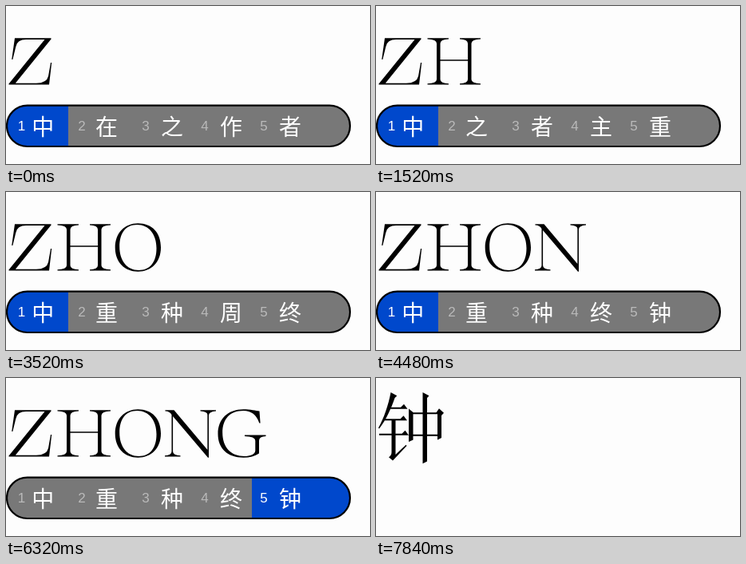
Recreate the animation shown at these times as an HTML page with a canvas. Size 456 by 198 pixels, loop 9840 ms.

```html
<!DOCTYPE html>
<html lang="zh-Hans">
<head>
<meta charset="utf-8">
<title>Pinyin input</title>
<style>
  html, body { margin: 0; width: 100%; height: 100%; overflow: hidden; background: #fdfdfd; }
  canvas { display: block; }
</style>
</head>
<body>
<canvas id="stage" width="456" height="198"></canvas>
<script>
const ctx = document.getElementById('stage').getContext('2d');
const LOOP = 9840;

// Each step: start time, letters typed, candidates, selected index.
const STEPS = [
  [0, 1, '中在之作者', 0],
  [1120, 2, '中之者主重', 0],
  [2640, 3, '中重种周终', 0],
  [4000, 4, '中重种终钟', 0],
  [5120, 5, '中重种终钟', 0],
  [6320, 5, '中重种终钟', 4],
  [7840, 0, '', -1]
];

const DIGIT_X = [19.5, 95, 175, 249, 323];
const WORD_X = [46.2, 126, 208, 282, 356];

// Upright stem from x0 to x1 with thin bracketed serifs, as one outline.
function stem(left, right, x0, x1) {
  return `M${left} 40.2H${right}V41.4Q${x1} 41.8 ${x1} 47V92Q${x1} 97 ${right} 97.3V98.6` +
    `H${left}V97.3Q${x0} 97 ${x0} 92V47Q${x0} 41.8 ${left} 41.4Z`;
}

const LETTERS = [
  // Z
  'M11 40.2H56.5V41.4L11.8 96.8H38Q51 96.6 53 88L56 71H57.2L54 98.6H3.5V97.4L48.5 42H25' +
  'Q14 42 12.3 51L8.4 67H7.2Z',
  // H
  stem(64.5, 91, 76, 80.5) + stem(105, 131, 115, 119.5) + 'M79 67.3H116V68.7H79Z',
  // O
  'M165.3 39.2C183 39.2 194 51 194 69.5S182 99.7 165.3 99.7 136.7 88 136.7 69.5 149 39.2 165.3 39.2Z' +
  'M164.3 41C149.5 41 142.2 52 142.2 68.5C142.2 86 151.5 98 166.3 98' +
  'C181 98 188.5 87 188.5 70.5C188.5 53 179 41 164.3 41Z',
  // N
  'M199.5 40.2H210.5L252.4 90V46Q252.4 42 243.5 41.5V40.2H263V41.5Q254 42 254 47V99.8H253' +
  'L209.1 48V92Q209.1 97 218.5 97.3V98.6H199V97.3Q207.5 97 207.5 92V46Q205 41.7 199.5 41.5Z',
  // G
  'M317.5 41.5L318.6 56.5H317.3C314 46 307 41 297.5 41C280 41 271.2 52 271.2 68.5' +
  'C271.2 87 282 98 298.5 98C306 98 312.3 95.6 312.3 91V78.5Q312.3 73.3 299 72.9V71.6H325.5V72.9' +
  'Q317 73.3 317 78.5V94.5C312 98 305 99.7 297.5 99.7C277 99.7 265.5 88 265.5 70' +
  'C265.5 51 278 39.2 297.5 39.2C306 39.2 313 41 317.5 41.5Z'
].map(d => new Path2D(d));

// Horizontal brush stroke ending in a triangular tip.
function across(x0, x1, y, tip) {
  return `M${x0} ${y - 1}H${x1 - tip * 1.7}L${x1 - tip * .9} ${y - tip}L${x1} ${y + 1}H${x0}Z`;
}

const CLOCK = new Path2D([
  'M18.5 18L26.3 22.3L23.5 25C19 38 13 52 4 63.5L3 62.5C10 50 15.5 34 18.5 18Z',
  across(16.5, 39.5, 37.8, 5),
  across(11, 39, 52.2, 5),
  across(4, 41, 70.8, 5),
  'M19.5 52H24.5V96L37.5 83.8L38.5 85L21 103.5L16 99.2Q19.5 97 19.5 93Z',
  'M41 38.5L46.5 43V77.5L41 80Z',
  'M44 43.3H75.5L79 38.2L85 43.8L82 47V75L77 77.5V45.3H44Z',
  'M44 70.8H79V72.8H44Z',
  'M58.5 18L66.5 22.3L64 25V104.5L58.5 107.3Z'
].join(''));

function drawBar(words, selected) {
  const bar = new Path2D();
  bar.roundRect(1, 124.6, 430, 51.4, 25.7);
  ctx.save();
  ctx.clip(bar);
  ctx.fillStyle = '#787878';
  ctx.fillRect(0, 123, 432, 55);
  ctx.fillStyle = '#0048cc';
  if (selected === 0) ctx.fillRect(0, 123, 78, 55);
  else ctx.fillRect(308, 123, 124, 55);
  ctx.restore();
  ctx.strokeStyle = '#000';
  ctx.lineWidth = 2.2;
  ctx.stroke(bar);

  ctx.textAlign = 'center';
  [...words].forEach((word, i) => {
    ctx.font = '17px "Liberation Sans", Arial, sans-serif';
    ctx.fillStyle = i === selected ? '#fff' : '#bababa';
    ctx.fillText(i + 1, DIGIT_X[i], 156);
    ctx.font = '28px "Noto Sans CJK SC", "Noto Sans CJK", sans-serif';
    ctx.fillStyle = '#fff';
    ctx.fillText(word, WORD_X[i], 162);
  });
}

function draw(t) {
  const [, typed, words, selected] = STEPS.findLast(step => t >= step[0]);
  ctx.fillStyle = '#fdfdfd';
  ctx.fillRect(0, 0, 456, 198);
  ctx.fillStyle = '#000';
  if (!typed) {
    ctx.fill(CLOCK);
    return;
  }
  LETTERS.slice(0, typed).forEach((path, i) => ctx.fill(path, i === 2 ? 'evenodd' : 'nonzero'));
  drawBar(words, selected);
}

const start = performance.now();
function tick() {
  draw((performance.now() - start) % LOOP);
  requestAnimationFrame(tick);
}
tick();
</script>
</body>
</html>
```
